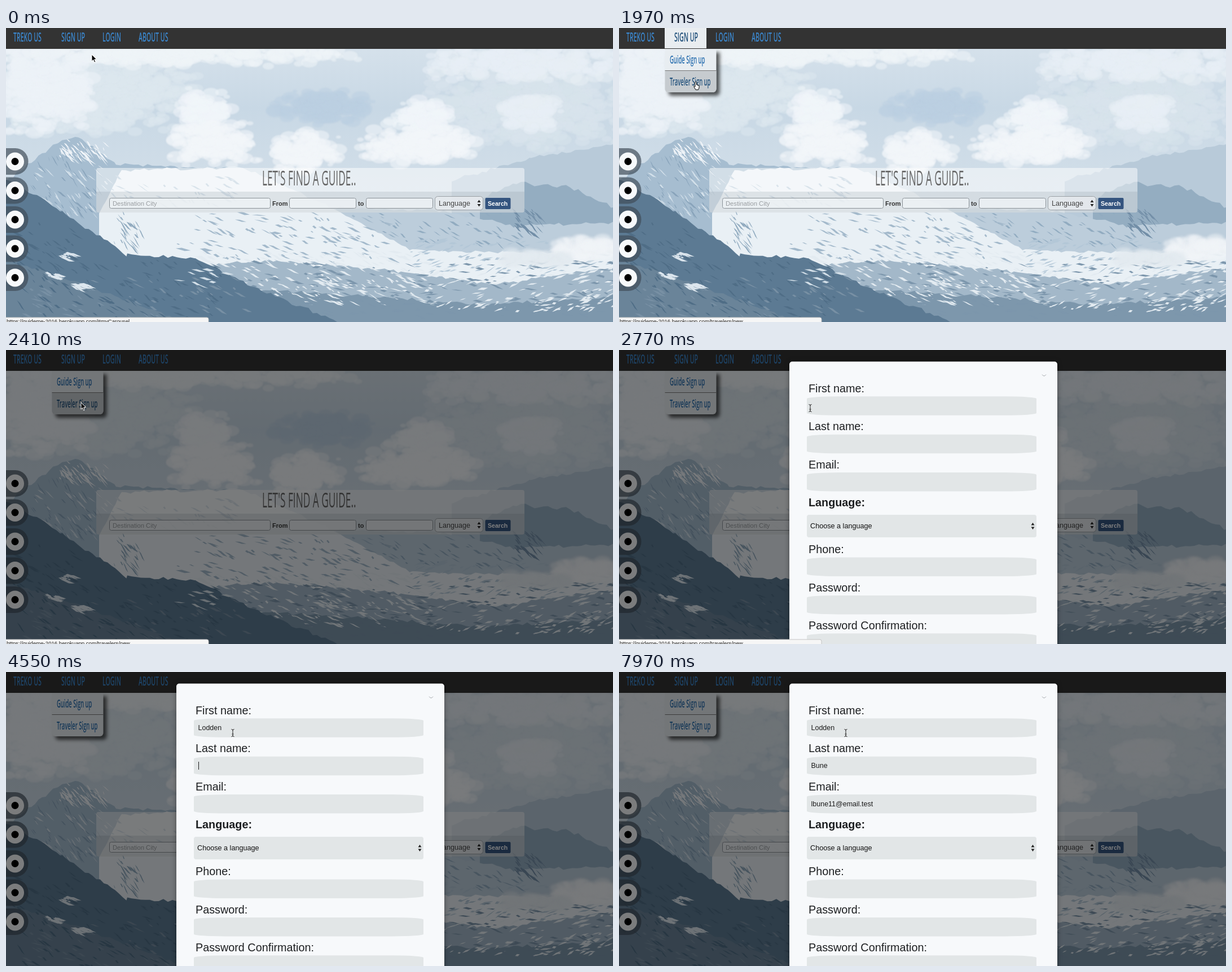
These frames come from a looping animation (1076x521 px, 8000 ms). An HTML page with a canvas:

```html
<!DOCTYPE html>
<html lang="en">
<head>
<meta charset="utf-8">
<title>Traveler sign up</title>
<style>
html, body { margin: 0; width: 100%; height: 100%; overflow: hidden; background: #333; }
canvas { display: block; }
</style>
</head>
<body>
<canvas id="stage" width="1076" height="521"></canvas>
<script>
const W = 1076, H = 521, LOOP = 8000;
const stage = document.getElementById('stage').getContext('2d');
let c = stage;

const SANS = '"Liberation Sans", Arial, sans-serif';
const UI = 'Inter, sans-serif';
const HAND = '"Open Sans", sans-serif';

// ---------- helpers ----------
const clamp = v => Math.max(0, Math.min(1, v));

function text(s, x, y, size, color, { weight = 400, family = SANS, align = 'left' } = {}) {
  c.font = `${weight} ${size}px ${family}`;
  c.textAlign = align;
  c.fillStyle = color;
  c.fillText(s, x, y);
}

// the narrow display face
function hand(s, x, y, size, color, weight = 600) {
  c.save();
  c.translate(x, y);
  c.scale(0.48, 1);
  text(s, 0, 0, size, color, { weight, family: HAND });
  c.restore();
}

function box(x, y, w, h, r, fill, line) {
  c.beginPath();
  c.roundRect(x, y, w, h, r);
  c.fillStyle = fill;
  c.fill();
  if (line) { c.strokeStyle = line; c.lineWidth = 1; c.stroke(); }
}

function dot(x, y, r, color) {
  c.beginPath();
  c.arc(x, y, r, 0, 7);
  c.fillStyle = color;
  c.fill();
}

function shape(path, fill, line) {
  const p = new Path2D(path);
  if (fill) { c.fillStyle = fill; c.fill(p); }
  if (line) { c.strokeStyle = line; c.lineWidth = 1; c.stroke(p); }
}

function arrows(x, y) {
  shape(`M${x - 3} ${y - 1.5}h6l-3 -4.5zM${x - 3} ${y + 1.5}h6l-3 4.5z`, '#222');
}

// ---------- landscape ----------
let seed = 11;
const rnd = () => {
  seed = (seed * 1664525 + 1013904223) % 4294967296;
  return seed / 4294967296;
};
const spread = () => rnd() - rnd();

// cloud: many small translucent blobs, denser in the middle
function cloud(x, y, rx, ry, color) {
  c.fillStyle = color;
  c.globalAlpha = 0.55;
  for (let n = rx * ry / 22 + 25; n > 0; n--) {
    const r = 3 + rnd() * 11;
    c.beginPath();
    c.ellipse(x + spread() * rx, y + spread() * ry, r * 1.3, r * 0.8, 0, 0, 7);
    c.fill();
  }
  c.globalAlpha = 1;
}

// rough skyline through a few points, filled to the bottom
function ridge(color, ...pts) {
  c.beginPath();
  c.moveTo(pts[0], H);
  for (let i = 0; i < pts.length - 2; i += 2) {
    const [x, y, u, v] = pts.slice(i, i + 4);
    for (let k = 0; k < 1; k += 8 / Math.hypot(u - x, v - y))
      c.lineTo(x + (u - x) * k, y + (v - y) * k + spread() * 4);
  }
  c.lineTo(pts.at(-2), pts.at(-1));
  c.lineTo(pts.at(-2), H);
  c.fillStyle = color;
  c.fill();
}

// thin slivers of snow or rock lying along a slope
function streaks(color, x, y, w, h, angle, density = 1) {
  c.fillStyle = color;
  for (let n = w * h / 220 * density; n > 0; n--) {
    const px = x + rnd() * w, py = y + rnd() * h;
    const l = 5 + rnd() * 22, a = angle + spread() * 0.35, t = 0.8 + rnd() * 1.8;
    const dx = Math.cos(a) * l, dy = Math.sin(a) * l;
    c.beginPath();
    c.moveTo(px, py);
    c.lineTo(px + dx * 0.4, py + dy * 0.4 - t);
    c.lineTo(px + dx, py + dy);
    c.lineTo(px + dx * 0.6, py + dy * 0.6 + t);
    c.fill();
  }
}

function paintLandscape() {
  const sheet = document.createElement('canvas');
  sheet.width = W;
  sheet.height = H;
  c = sheet.getContext('2d');
  const sky = c.createLinearGradient(0, 37, 0, 300);
  sky.addColorStop(0, '#d5e1eb');
  sky.addColorStop(0.4, '#c8d8e5');
  sky.addColorStop(1, '#d3dfe9');
  c.fillStyle = sky;
  c.fillRect(0, 0, W, H);

  c.filter = 'blur(1px)';
  cloud(150, 120, 200, 70, '#dde7ef');
  cloud(930, 140, 190, 80, '#d8e3ec');
  cloud(560, 140, 95, 32, '#bccfe2');
  cloud(300, 46, 340, 22, '#eff4f8');
  cloud(70, 110, 95, 80, '#edf2f7');
  cloud(920, 62, 190, 32, '#e8eff5');
  cloud(350, 150, 50, 45, '#f1f5f9');
  cloud(365, 205, 85, 40, '#f3f6fa');
  cloud(535, 220, 65, 38, '#f3f6fa');
  cloud(735, 165, 60, 42, '#f1f5f9');
  cloud(730, 210, 120, 32, '#f3f6fa');
  cloud(930, 150, 55, 35, '#e8eff5');
  c.filter = 'blur(0.5px)';

  ridge('#b8cad9', 790, 270, 930, 230, W, 206);
  ridge('#94adc1', 840, 302, 905, 274, 1000, 282, W, 318);
  ridge('#a6bdd0', 0, 272, 92, 203, 128, 192, 195, 242, 420, 250);
  streaks('#f1f5f9', 92, 196, 80, 32, 0.8, 5);
  streaks('#88a3ba', 40, 225, 120, 100, 0.9);
  streaks('#d3e0ea', 50, 230, 130, 100, 0.8, 0.7);
  ridge('#bccddb', 560, 318, 760, 322, 900, 350, W, 345);
  streaks('#91abc0', 660, 325, 250, 55, 0.5, 0.7);
  streaks('#728ea7', 895, 318, 50, 45, 0.8, 3);

  // snow field and the slopes below it
  ridge('#e9f0f5', 165, 330, 205, 252, 420, 248, 560, 310, 720, 395, W, 400);
  streaks('#b3c7d7', 180, 260, 240, 50, 0.5, 0.8);
  streaks('#8fa9be', 190, 325, 50, 60, 0.9, 2);
  streaks('#a3b9cb', 300, 325, 380, 90, 0.35, 0.8);
  streaks('#b3c7d7', 700, 380, 376, 60, -0.3, 1.2);
  ridge('#a3b8c9', 290, 425, 480, 412, 700, 432, 860, 455, W, 425);
  ridge('#7d97ac', 380, 460, 560, 470, 860, 490, W, 475);
  streaks('#e3ebf1', 330, 395, 420, 90, 0.35, 1.3);
  streaks('#e3ebf1', 740, 425, 336, 80, -0.35, 1.1);
  streaks('#7c96ac', 420, 410, 656, 100, 0.1, 0.6);
  c.filter = 'blur(2px)';
  cloud(1035, 390, 75, 20, '#f0f4f8');
  cloud(940, 408, 70, 10, '#e3ebf1');
  c.filter = 'blur(0.5px)';

  ridge('#5c7a93', 0, 266, 100, 326, 215, 402, 335, 407, 440, 460, 590, H);
  ridge('#6a8499', 0, 410, 140, 455, 320, H);
  streaks('#4f6d86', 0, 340, 120, 180, 0.6, 0.7);
  streaks('#4f6d86', 120, 410, 260, 110, 0.5, 0.7);
  streaks('#7890a4', 20, 440, 400, 80, 0.4, 0.4);
  streaks('#d3dfe8', 290, 425, 100, 30, 0.3, 0.8);
  for (const [x, y] of [[88, 398], [66, 433], [112, 452]])
    streaks('#dce6ee', x, y, 24, 9, 0.3, 14);
  c = stage;
  return sheet;
}
const landscape = paintLandscape();

// ---------- page ----------
function searchPanel() {
  box(160, 248, 759, 42, [4, 4, 0, 0], 'rgba(255,255,255,.5)');
  box(160, 290, 759, 37, [0, 0, 4, 4], 'rgba(214,219,222,.6)');
  hand("LET'S FIND A GUIDE..", 454, 279, 36, '#666', 400);
  for (const [x, w] of [[183.5, 285], [502.5, 118], [638.5, 118]])
    box(x, 301.5, w, 18, 3, 'rgba(241,244,247,.75)', '#8b9298');
  text('Destination City', 189, 314.5, 11.2, '#999da1');
  text('From', 472, 314.5, 11, '#333', { weight: 700 });
  text('to', 624, 314.5, 11, '#333', { weight: 700 });
  box(760.5, 298.5, 85, 24, 5, 'rgba(232,236,239,.85)', '#9aa0a5');
  text('Language', 767, 315, 12.6, '#444');
  arrows(838.5, 310.5);
  box(849.5, 301, 45, 20, 2, '#34547f');
  text('Search', 854, 314.5, 10.6, '#fff', { weight: 700 });
}

function socialBar() {
  for (let i = 0; i < 5; i++) {
    const y = 236.5 + i * 51.5;
    box(0, y - 23.5, 39.5, 47, [0, 23, 23, 0], 'rgba(64,76,88,.68)');
    dot(16, y, 16, '#f7f9fb');
    dot(16, y, 6.5, '#000');
  }
}

function navBar(active) {
  c.fillStyle = '#333';
  c.fillRect(0, 0, W, 37);
  if (active) box(81, 0, 74, 36, 0, '#e9edf0');
  [['TREKO US', 13], ['SIGN UP', 98], ['LOGIN', 171], ['ABOUT US', 235]].forEach(([s, x], i) =>
    hand(s, x, 23.5, 22, active && i === 1 ? '#23527c' : '#3b86cc'));
}

function menu(hover) {
  c.save();
  c.shadowColor = 'rgba(0,0,0,.65)';
  c.shadowBlur = 6;
  c.shadowOffsetX = c.shadowOffsetY = 6;
  box(81.5, 37, 91, 77, [0, 0, 6, 6], '#e8edf1');
  c.restore();
  ['Guide Sign up', 'Traveler Sign up'].forEach((s, i) => {
    const y = 37 + 38.5 * i, on = hover === i;
    if (on) box(81.5, y, 91, 38.5, i ? [0, 0, 6, 6] : 0, '#c6cbcf');
    hand(s, 90, y + 26, 19.6, on ? '#23527c' : '#2b70b0');
  });
  c.fillStyle = '#777';
  c.fillRect(81.5, 75, 91, 1);
}

function statusBar(path) {
  box(-2, 513, 361, 20, [0, 3, 0, 0], '#f6f6f6', '#c4c4c4');
  text('https://guideme-2016.herokuapp.com/' + path, 1, 523, 9.6, '#222');
}

// ---------- sign-up form ----------
const fullName = 'Lodden Bune', phone = '(555) 555-0148';
const mails = ['lbune157@email.test', 'lbune156@email.test'];
const fields = [
  { value: 'Lodden', focus: 2920, hints: [['Lodden', mails[0]], ['Lodden', mails[1]]] },
  { value: 'Bune', focus: 4550, hints: [['Bune', fullName], ['Bune', mails[1]], ['Bune', phone]] },
  { value: 'lbune11@email.test', focus: 5290, hints: [[mails[0], fullName], [mails[1], phone]] },
];
const BLUR = 7970, BLINK = 450;

// bursts of typing: field, first key, last key, letters before and after
const bursts = [
  [0, 3810, 4400, 0, 6],
  [1, 4990, 5140, 0, 4],
  [2, 5590, 6030, 0, 6],
  [2, 7070, 7080, 6, 7],
  [2, 7370, 7670, 7, 18],
];

function typed(index, t) {
  let letters = 0, last = fields[index].focus;
  for (const [field, from, to, before, after] of bursts) {
    if (field !== index || t < from) continue;
    const p = clamp((t - from) / (to - from));
    letters = Math.max(before + 1, Math.floor(before + (after - before) * p));
    last = Math.min(t, to);
  }
  return { letters, last };
}

function field(y) {
  c.beginPath();
  c.roundRect(333, y, 407, 33.5, { x: 55, y: 4 });
  c.fillStyle = '#e2e6e7';
  c.fill();
}

function hintList(rows, y, settings) {
  const n = rows.length;
  box(332.5, y + 0.5, 407, 19 * n + (settings ? 20.5 : 1), 0, '#fff', '#8fbce6');
  rows.forEach(([left, right], i) => {
    text(left, 339, y + 15 + 19 * i, 10, '#000', { weight: 700, family: UI });
    text(right, 732, y + 14.5 + 19 * i, 9.5, '#777', { family: UI, align: 'right' });
  });
  if (!settings) return;
  c.fillStyle = '#ddd';
  c.fillRect(333, y + 19 * n + 1, 406, 1);
  text('Glimmo Autofill settings...', 339, y + 19 * n + 16, 10, '#111', { family: UI });
}

function form(t) {
  c.save();
  c.shadowColor = 'rgba(0,0,0,.4)';
  c.shadowBlur = 8;
  box(302, 20.5, 475, 520, 5, '#f7f9fb');
  c.restore();
  shape('M750 43.5q3.5 5 7 0', null, '#a5a8ab');
  ['First name:', 'Last name:', 'Email:', 'Phone:', 'Password:', 'Password Confirmation:'].forEach((s, i) => {
    const y = 75 + 67.4 * i + (i > 2 ? 83 : 0);
    text(s, 336, y, 19.8, '#1d1f21');
    field(y + 7.3);
  });
  text('Language:', 336, 277, 19.8, '#1d1f21', { weight: 700 });
  box(333, 292, 407, 40, 4, '#e2e6e7');
  text('Choose a language', 339, 316, 12.65, '#111');
  arrows(733.5, 312);

  const focus = t < BLUR ? fields.findLastIndex(f => t >= f.focus) : -1;
  fields.forEach(({ value, hints }, i) => {
    const { letters, last } = typed(i, t);
    const y = 103 + i * 67.4;
    text(value.slice(0, letters), 340.5, y, 12.5, '#1a1a1a');
    if (i !== focus) return;
    if ((t - last) % (2 * BLINK) < BLINK) {
      const x = 341 + c.measureText(value.slice(0, letters)).width;
      c.fillRect(Math.round(x), Math.round(y) - 11, 1, 14);
    }
    const known = letters < 7;
    if (letters) hintList(known ? hints : [[value, '']], Math.round(y + 13), known);
  });
}

// ---------- pointer ----------
const route = [
  [0, 152, 47], [220, 138, 50], [620, 130, 26], [1070, 120, 30], [1870, 134, 95],
  [2320, 133, 93], [2770, 339, 103], [3220, 402, 108],
];
const looks = {
  arrow: ['M0 0v12l2.8 -2.6l2 4.6l2 -.9l-2 -4.4h3.8z', '#000', '#fff'],
  finger: ['M1 1q1.5 -1.5 2.5 .5v4l4.5 1.5v4l-1.5 3.5h-4.5l-3.5 -6l1 -.6l1.5 1.3z', '#fff', '#000'],
  beam: ['M-2.5 -6.5q2.5 0 2.5 2v9q0 2 -2.5 2M2.5 -6.5q-2.5 0 -2.5 2M2.5 6.5q-2.5 0 -2.5 -2M-1.5 2h3', null, '#222'],
};

function pointer(t) {
  // the pointer moves in steps of 150 ms
  const s = Math.max(0, Math.floor((t - 70) / 150) * 150 + 70);
  const i = route.findLastIndex(p => p[0] <= s);
  const [t0, x0, y0] = route[i], [t1, x1, y1] = route[i + 1] || [Infinity, x0, y0];
  const p = (s - t0) / (t1 - t0);
  c.save();
  c.translate(x0 + (x1 - x0) * p, y0 + (y1 - y0) * p);
  shape(...looks[t >= 2770 ? 'beam' : t >= 630 && t < 2410 ? 'finger' : 'arrow']);
  c.restore();
}

// ---------- one picture ----------
const links = [[0, '#myCarousel'], [150, ''], [630, '#'], [1370, 'guides/new'], [1820, 'travelers/new'], [2920, '']];

function draw(t) {
  const link = links.findLast(l => l[0] <= t)[1];
  c.drawImage(landscape, 0, 0);
  searchPanel();
  socialBar();
  navBar(t >= 630 && t < 2270);
  if (t >= 930) menu(t < 2590 ? ['guides/new', 'travelers/new'].indexOf(link) : -1);
  if (t >= 2270) {
    c.fillStyle = `rgba(0,0,0,${Math.min(0.5, 0.25 + (t - 2270) / 560)})`;
    c.fillRect(0, 0, W, H);
  }
  if (t >= 2590) {
    const p = clamp((t - 2500) / 270);
    c.save();
    c.globalAlpha = p;
    c.translate(0, -70 * (1 - p));
    form(t);
    c.restore();
  }
  if (link) statusBar(link);
  pointer(t);
}

const start = performance.now();
function tick() {
  draw((performance.now() - start) % LOOP);
  requestAnimationFrame(tick);
}
tick();
</script>
</body>
</html>
```
